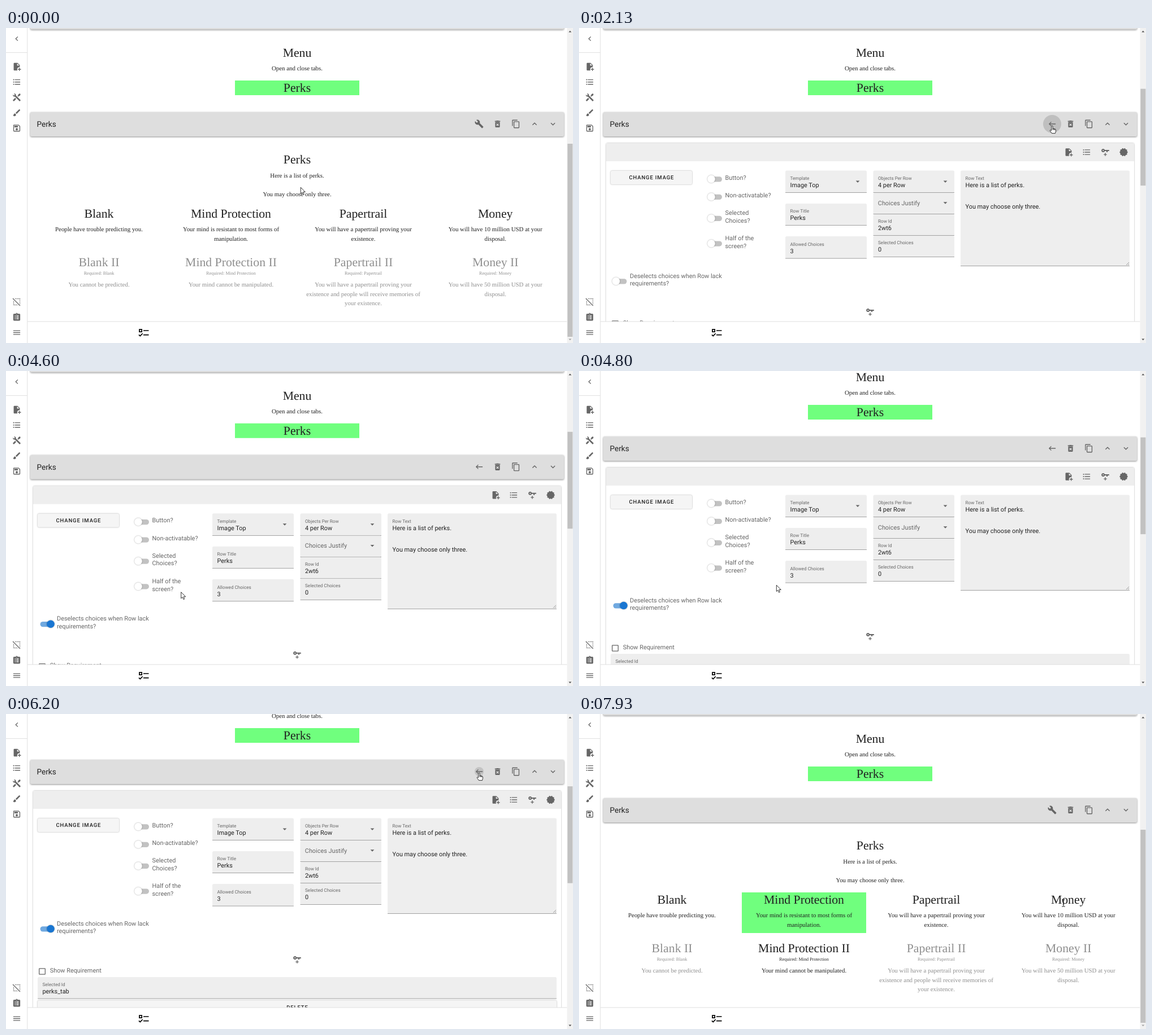
An HTML page that plays this animation: 1003x558 px, repeating every 8 s.

```html
<!DOCTYPE html>
<html lang="en">
<head>
<meta charset="utf-8">
<title>Perks editor</title>
<style>
html, body { margin: 0; width: 100%; height: 100%; overflow: hidden; background: #fff; }
svg { display: block; width: 1003px; height: 558px; text-rendering: geometricPrecision; }
.serif { font-family: "Liberation Serif", "Times New Roman", serif; text-anchor: middle; }
.sans { font-family: Roboto, sans-serif; font-size: 10.88px; }
.btn { font-weight: 500; font-size: 9.52px; letter-spacing: .85px; text-anchor: middle; }
.card { filter: drop-shadow(0 1px 1.5px rgba(0,0,0,.45)); }
.soft { filter: drop-shadow(0 .7px 1px rgba(0,0,0,.35)); }
</style>
</head>
<body>
<svg id="stage" viewBox="0 0 1003 558"></svg>
<script>
const INK = '#212121', GREY = '#666', GREEN = '#70ff7e';
const ICONS = {
  left: 'M15.4 16.6 10.8 12l4.6-4.6L14 6l-6 6 6 6z',
  up: 'M7.4 15.4 12 10.8l4.6 4.6L18 14l-6-6-6 6z',
  down: 'M7.4 8.6 12 13.2l4.6-4.6L18 10l-6 6-6-6z',
  back: 'M21 11H6.8l3.6-3.6L9 6l-6 6 6 6 1.4-1.4L6.8 13H21z',
  file: 'M14 2H6a2 2 0 0 0-2 2v16a2 2 0 0 0 2 2h7.8A6 6 0 0 1 20 13.1V8zM13 9V3.5L18.5 9zM23 20h-3v3h-2v-3h-3v-2h3v-3h2v3h3z',
  list: 'M7 5h14v2H7zM7 11h14v2H7zM7 17h14v2H7z' + [6, 12, 18].map(y => `M2.5 ${y}a1.5 1.5 0 1 1 3 0a1.5 1.5 0 1 1-3 0z`).join(''),
  tools: 'M21.7 20.3l-1.4 1.4a1 1 0 0 1-1.4 0L7 9.85A4 4 0 0 1 2.2 4.7l2.56 2.54 2.48-2.48L4.7 2.2A4 4 0 0 1 9.85 7l11.85 11.9a1 1 0 0 1 0 1.4M2.3 18.9a1 1 0 0 0 0 1.4l1.4 1.4a1 1 0 0 0 1.4 0l5.5-5.45-2.83-2.83M20 2l-4 2v2l-2.2 2.2 2 2L18 8h2l2-4z',
  brush: 'M20.7 4.6l-1.3-1.3a1 1 0 0 0-1.4 0l-9 8.95L11.75 15l8.95-9a1 1 0 0 0 0-1.4M7 14a3 3 0 0 0-3 3c0 1.3-1.2 2-2 2 .9 1.2 2.5 2 4 2a4 4 0 0 0 4-4 3 3 0 0 0-3-3z',
  save: 'M17 3H5a2 2 0 0 0-2 2v14a2 2 0 0 0 2 2h14a2 2 0 0 0 2-2V7zM19 19H5V5h11.2L19 7.8zM9 15a3 3 0 1 1 6 0a3 3 0 1 1-6 0zM6 6h9v4H6z',
  clip: 'M19 3h-4.2a3 3 0 0 0-5.6 0H5a2 2 0 0 0-2 2v14a2 2 0 0 0 2 2h14a2 2 0 0 0 2-2V5a2 2 0 0 0-2-2M11 4a1 1 0 1 1 2 0a1 1 0 1 1-2 0z' + [7, 11, 15].map(y => `M7 ${y}h2v2H7zM11 ${y}h6v2h-6z`).join(''),
  menu: 'M3 6h18v2H3zM3 11h18v2H3zM3 16h18v2H3z',
  wrench: 'M22.7 19l-9.1-9.1c.9-2.3.4-5-1.5-6.9-2-2-5-2.4-7.4-1.3L9 6 6 9 1.6 4.7C.4 7.1.9 10.1 2.9 12.1c1.9 1.9 4.6 2.4 6.9 1.5l9.1 9.1c.4.4 1 .4 1.4 0l2.3-2.3c.5-.4.5-1.1.1-1.4z',
  trash: 'M6 19a2 2 0 0 0 2 2h8a2 2 0 0 0 2-2V7H6zM8.5 11.9l1.4-1.4 2.1 2.1 2.1-2.1 1.4 1.4-2.1 2.1 2.1 2.1-1.4 1.4-2.1-2.1-2.1 2.1-1.4-1.4 2.1-2.1zM15.5 4l-1-1h-5l-1 1H5v2h14V4z',
  copy: 'M19 21H8V7h11zM19 5H8a2 2 0 0 0-2 2v14a2 2 0 0 0 2 2h11a2 2 0 0 0 2-2V7a2 2 0 0 0-2-2M16 1H4a2 2 0 0 0-2 2v14h2V3h12z',
  key: 'M6.5 3a4.5 4.5 0 0 1 4.24 3H22v3h-4v3h-3V9h-4.26A4.5 4.5 0 1 1 6.5 3M5 7.5a1.5 1.5 0 1 0 3 0a1.5 1.5 0 1 0-3 0zM8 17h3v-3h2v3h3v2h-3v3h-2v-3H8z',
  badge: 'M' + Array.from({ length: 20 }, (_, i) => {
    const r = i % 2 ? 9 : 11, a = i * Math.PI / 10;
    return `${(12 + r * Math.cos(a)).toFixed(1)} ${(12 + r * Math.sin(a)).toFixed(1)}`;
  }).join('L') + 'z'
};

const icon = (name, x, y) =>
  `<path transform="translate(${x} ${y}) scale(.68) translate(-12 -12)" fill="${GREY}" fill-rule="evenodd" d="${ICONS[name]}"/>`;
const box = (x, y, x2, y2, fill, more = '') =>
  `<rect x="${x}" y="${y}" width="${x2 - x}" height="${y2 - y}" fill="${fill}" ${more}/>`;
const serif = (s, x, y, size = 10.88) => `<text class="serif" x="${x}" y="${y}" font-size="${size}">${s}</text>`;
const head = (s, x, y) => serif(s, x, y, 21.76);
const sans = (s, x, y, fill = INK, size = 10.88) =>
  `<text class="sans" x="${x}" y="${y}" fill="${fill}" style="font-size:${size}px">${s}</text>`;
const button = (s, x, y, x2, y2) => box(x, y, x2, y2, '#f5f5f5', 'rx="2.5" class="soft"') +
  `<text class="sans btn" x="${(x + x2) / 2 + .4}" y="${y + 15.3}" fill="${INK}">${s}</text>`;
const caret = (x, y) => `<path d="M${x - 3.4} ${y - 1.7}h6.8l-3.4 3.4z" fill="${GREY}"/>`;

function field(label, value, x, y, x2, y2, labelY, id = '') {
  return box(x, y, x2, y2, '#eee', 'rx="2.5"') + (id && box(x, y, x2, y2, '#000', `id="${id}" opacity="0"`)) +
    box(x, y2 - .8, x2, y2, '#8f8f8f') +
    sans(label, x + 8.5, labelY, GREY, 8.16) + sans(value, x + 8.5, labelY + 13);
}
function toggle(x, y, lines, lineY, id = '') {
  return box(x - 5, y - 4.3, x + 19, y + 5, '#c2c2c2', `rx="4.7" id="${id}track"`) +
    `<circle id="${id}thumb" class="soft" cx="${x}" cy="${y}" r="6.8" fill="#fff"/>` +
    lines.map((s, i) => sans(s, x + 24.5, lineY + i * 13.6, GREY)).join('');
}
function perk(x, name, lines, name2, lines2, i) {
  return (i == 1 ? box(288, 316, 508, 388, GREEN, 'id="picked"') : '') + head(name, x, 336) +
    lines.map((s, n) => serif(s, x, 360.3 + n * 16.3)).join('') +
    `<g id="perk${i}" opacity=".5">` + head(name2, x, 421.7) + serif('Required: ' + name, x, 436.5, 8.16) +
    lines2.map((s, n) => serif(s, x, 458.2 + n * 16.3)).join('') + '</g>';
}

const perks = [
  [164.5, 'Blank', ['People have trouble predicting you.'], 'Blank II', ['You cannot be predicted.']],
  [398, 'Mind Protection', ['Your mind is resistant to most forms of', 'manipulation.'],
    'Mind Protection II', ['Your mind cannot be manipulated.']],
  [632, 'Papertrail', ['You will have a papertrail proving your', 'existence.'],
    'Papertrail II', ['You will have a papertrail proving your', 'existence and people will receive memories of', 'your existence.']],
  [865.7, 'Money', ['You will have 10 million USD at your', 'disposal.'],
    'Money II', ['You will have 50 million USD at your', 'disposal.']]
];

const shared = box(43, -40, 987, 2.5, '#dedede', 'rx="2.5" class="card"') +
  head('Menu', 515, 51) + serif('Open and close tabs.', 515, 75.3) +
  box(405, 93, 625, 119, GREEN) + head('Perks', 515, 113.3) +
  box(43, 149, 987, 192, '#dedede', 'rx="2.5" class="card"') + sans('Perks', 54.5, 175.3, INK, 13.6) +
  '<circle id="ripple" cx="837" cy="170"/>' +
  icon('trash', 869.5, 170) + icon('copy', 902, 170) + icon('up', 935, 170) + icon('down', 967.5, 170);

const view = icon('wrench', 837, 170) + head('Perks', 515, 240.3) +
  serif('Here is a list of perks.', 515, 265) + serif('You may choose only three.', 515, 297.7) +
  perks.map((p, i) => perk(...p, i)).join('');

const edit = icon('back', 837, 170) + box(48, 204, 982, 700, '#fff', 'rx="2.5" class="soft"') +
  box(48, 204, 982, 236, '#eee') +
  icon('file', 866, 220) + icon('list', 898, 220) + icon('key', 931, 220) + icon('badge', 963.5, 220) +
  button('CHANGE IMAGE', 56, 253, 200, 277) +
  toggle(234, 267.5, ['Button?'], 268.7) + toggle(234, 299, ['Non-activatable?'], 300.2) +
  toggle(234, 337, ['Selected', 'Choices?'], 331) + toggle(234, 381.7, ['Half of the', 'screen?'], 376.2) +
  toggle(65.5, 448.5, ['Deselects choices when Row lack', 'requirements?'], 442.5, 'lack') +
  field('Template', 'Image Top', 365, 252.5, 509, 292, 268.8) + caret(493, 272.3) +
  field('Row Title', 'Perks', 365, 311, 509, 350, 327.4) +
  field('Allowed Choices', '3', 365, 369, 509, 408.5, 385.8) +
  field('Objects Per Row', '4 per Row', 520.5, 252.5, 664, 292, 268.8) + caret(648, 272.3) +
  field('', '', 520.5, 292, 664, 330, 308) + sans('Choices Justify', 528.8, 313.7, GREY) + caret(648, 310) +
  field('Row Id', '2wt6', 520.5, 330, 664, 368, 345) +
  field('Selected Choices', '0', 520.5, 368, 664, 406, 383, 'hoverCount') +
  field('Row Text', 'Here is a list of perks.', 675, 252.5, 974, 422, 268.8, 'hoverText') +
  sans('You may choose only three.', 683.5, 319.8) +
  '<path d="M968 420l5-5M971 420l2-2" stroke="#777" stroke-width=".7"/>' +
  icon('key', 515, 503) +
  box(58.7, 518.8, 69.3, 529.2, 'none', `stroke="${GREY}" stroke-width="1.3" rx=".7"`) +
  sans('Show Requirement', 77.7, 525.7, GREY) +
  field('Selected Id', 'perks_tab', 56, 534, 974, 572.5, 550) +
  button('DELETE', 56, 575.3, 974, 600);

const side = box(0, 0, 38, 558, '#fff') + box(37.3, 0, 38.3, 558, '#e0e0e0') + box(0, 43, 38, 44, '#e0e0e0') +
  ['file', 'list', 'tools', 'brush', 'save'].map((n, i) => icon(n, 19, 68.5 + i * 27.2)).join('') +
  icon('left', 19, 19) + icon('clip', 19, 512.3) + icon('menu', 19, 539.5) +
  `<g stroke="${GREY}" fill="none" stroke-width="1.3">
    <rect x="13.5" y="479.5" width="11" height="11" stroke-dasharray="1.37"/>
    <path d="M12 479l13 13" stroke="#fff" stroke-width="3.4"/><path d="M12 479l13 13"/></g>`;

const bottom = box(38, 520, 992.5, 558, '#fff') + box(38, 519.5, 992.5, 520.5, '#e0e0e0') +
  `<g fill="none" stroke="#000" stroke-width="1.7"><rect x="236" y="534" width="4.2" height="4.2"/>
    <path d="M235 543.3l2.3 2.3 4.4-4.6M243 536h9.5M243 543.7h9.5"/></g>`;

const scrollbar = box(992.5, 0, 1003, 558, '#f1f1f1') + '<rect id="bar" x="993.3" width="9" fill="#c1c1c1"/>' +
  '<path d="M995.3 7.5h5l-2.5-2.7z" fill="#505050"/><path id="downTip" d="M995.3 550.5h5l-2.5 2.7z"/>';

const cursors = `<g id="cursor" stroke-linejoin="round">
  <path id="arrow" d="M.3 .3V11.5L2.8 9.2 4.6 13.3 6.4 12.5 4.7 8.5H8.3z" fill="#fff" stroke="#000" stroke-width=".8"/>
  <path id="hand" d="M-1.2 8.6V1.4a1.1 1.1 0 0 1 2.3 0V5.2l4 .8q1.4.4 1.3 1.8v2.6l-1 3.2h-6L-3.6 9.3q-.6-1.4.5-1.6 .8 0 1.9 1.2M1.1 5.2v2.4M2.9 5.6v2.2M4.7 5.9v2" fill="#fff" stroke="#000" stroke-width=".8"/>
  <path id="beam" d="M-2.8-6h2L0-5.4.8-6h2M0-5.4V5.4M-2.8 6h2L0 5.4.8 6h2M-1.2 1.8h2.4" fill="none" stroke="#000" stroke-width=".9"/>
</g>`;

document.getElementById('stage').innerHTML =
  `<g id="page" fill="${INK}">${shared}<g id="view">${view}</g><g id="edit">${edit}</g></g>` +
  bottom + side + scrollbar + cursors;

const el = id => document.getElementById(id);
const set = (id, attrs) => { for (const k in attrs) el(id).setAttribute(k, attrs[k]); };
const show = (id, on) => set(id, { visibility: on ? 'visible' : 'hidden' });
const clamp = v => Math.min(1, Math.max(0, v));
const ease = (t, a, b) => { const p = clamp((t - a) / (b - a)); return p * p * (3 - 2 * p); };
// linear value of column c at time t
function along(keys, t, c = 1) {
  const i = keys.findIndex(k => k[0] > t);
  if (i < 0) return keys[keys.length - 1][c];
  if (!i) return keys[0][c];
  const a = keys[i - 1], b = keys[i];
  return a[c] + (b[c] - a[c]) * (t - a[0]) / (b[0] - a[0]);
}

const PATH = [
  [0, 521, 282], [60, 521, 282], [200, 545, 278], [500, 690, 240], [730, 790, 200], [870, 812, 190],
  [1000, 816, 187], [1400, 837, 173], [2200, 837, 173], [2340, 855, 190], [2600, 600, 250], [2900, 230, 400],
  [3070, 163, 424], [3330, 101, 446], [3670, 101, 446], [3900, 160, 435], [4330, 256, 408], [4800, 349, 379],
  [5000, 545, 322], [5200, 710, 256], [5400, 760, 225], [5700, 825, 125], [5930, 837, 104], [6400, 837, 104],
  [6530, 830, 110], [6733, 798, 137], [7000, 540, 300], [7200, 422, 352], [7400, 422, 352], [7670, 640, 350],
  [7933, 857, 335]
];
const SHAPES = [
  [0, 'arrow'], [1150, 'hand'], [2300, 'arrow'], [3190, 'hand'], [3950, 'arrow'], [5100, 'beam'], [5480, 'arrow'],
  [5780, 'hand'], [6330, 'arrow'], [7130, 'beam'], [7480, 'arrow'], [7850, 'beam']
];
const RIPPLE = [
  [1800, 2, 0], [1866, 8, .14], [2000, 16, .16], [2200, 16, .16], [2600, 16, 0], [6130, 2, 0],
  [6200, 8, .14], [6330, 10.5, .14], [6733, 10.5, .08], [7100, 10.5, 0]
];

function draw(t) {
  const editing = t >= 1990 && t < 6260, picked = t >= 7320;
  const scroll = editing ? 33 * ease(t, 4590, 4790) + 35 * ease(t, 4800, 5060) : 0;
  show('view', !editing);
  show('edit', editing);
  show('picked', !editing && picked);
  set('perk1', { opacity: picked ? 1 : .5 });
  set('page', { transform: `translate(0 ${-scroll})` });
  set('bar', editing ? { y: 107.7 + scroll * .3, height: 171.5 } : { y: 205, height: 342 });
  set('downTip', { fill: editing ? '#505050' : '#a3a3a3' });
  set('ripple', { r: along(RIPPLE, t), opacity: along(RIPPLE, t, 2) });

  const on = t >= 3520, slide = ease(t, 3480, 3690), tint = clamp((t - 3500) / 110);
  set('lacktrack', { fill: on ? '#70a9e0' : '#c2c2c2' });
  set('lackthumb', {
    cx: 65.5 + 13.5 * slide,
    fill: on ? `rgb(${255 - 230 * tint},${255 - 137 * tint},${255 - 45 * tint})` : '#fff'
  });
  set('hoverCount', { opacity: along([[4950, 0], [5070, .07], [5200, .055], [5400, 0]], t) });
  set('hoverText', { opacity: along([[5200, 0], [5330, .05], [5550, .05], [5800, 0]], t) });

  const shape = SHAPES.filter(s => s[0] <= t).pop()[1];
  for (const s of ['arrow', 'hand', 'beam']) show(s, s == shape);
  set('cursor', { transform: `translate(${along(PATH, t)} ${along(PATH, t, 2)})` });
}

const start = performance.now();
function tick() {
  const t = (performance.now() - start) % 8000;
  draw(Math.floor(t * .015 + .1) / .015);
  requestAnimationFrame(tick);
}
tick();
</script>
</body>
</html>
```
